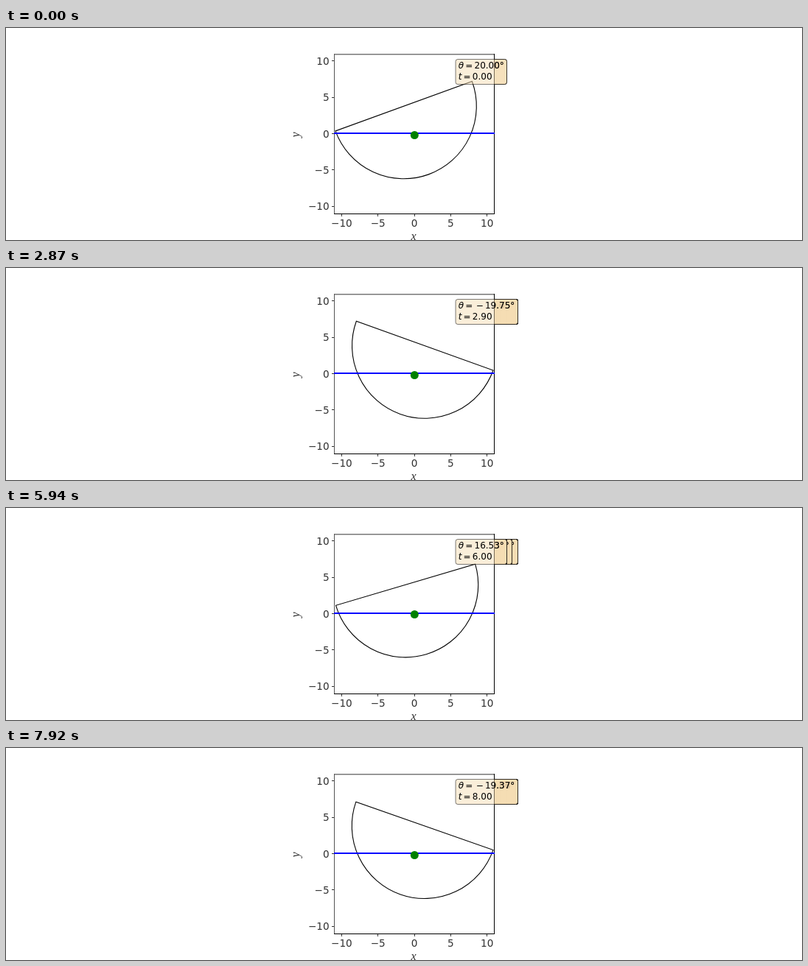
Write an HTML page with a canvas that moves like this. It is 1080 px wide and 288 px high and loops after 8 s.

```html
<!DOCTYPE html>
<html lang="en">
<head>
<meta charset="utf-8">
<title>Floating half disc</title>
<style>
  html, body { margin: 0; width: 100%; height: 100%; overflow: hidden; background: #fff; }
  canvas { display: block; }
</style>
</head>
<body>
<canvas width="1080" height="288"></canvas>
<script>
const ctx = document.querySelector('canvas').getContext('2d');
const LOOP = 8000, STEP = 99, LAST = 80, REPAINTS = 3;
const X0 = 554, Y0 = 143.5, SCALE = 217 / 22;
const LEFT = 445, TOP = 35, RIGHT = 663, BOTTOM = 253;

// Half disc of half the water's density: heave y and roll angle of its centroid
const R = 10, G = 9.81, MASS = 0.5 * Math.PI * R * R / 2;
const D = 4 * R / (3 * Math.PI), INERTIA = R * R / 2 - D * D;
const REST = 4.0397 - D;

function derive([angle, y, spin, rise]) {
  const h = y + D * Math.cos(angle);
  const submerged = R * R * Math.acos(h / R) - h * Math.sqrt(R * R - h * h);
  const lift = G * submerged / MASS;
  return [spin, rise, -lift * D * Math.sin(angle) / INERTIA, lift - G];
}

function rk4(s, dt) {
  const move = (k, f) => s.map((v, i) => v + k[i] * f);
  const a = derive(s), b = derive(move(a, dt / 2));
  const c = derive(move(b, dt / 2)), d = derive(move(c, dt));
  return s.map((v, i) => v + dt / 6 * (a[i] + 2 * b[i] + 2 * c[i] + d[i]));
}

const states = [[Math.PI / 9, REST, 0, 0]];
for (let i = 0; i < LAST; i++) {
  let s = states[i];
  for (let n = 0; n < 10; n++) s = rk4(s, 0.01);
  states.push(s);
}

const px = x => X0 + x * SCALE;
const py = y => Y0 - y * SCALE;

function rect(color, x, y, w, h) {
  ctx.fillStyle = color;
  ctx.fillRect(x, y, w, h);
}

function drawAxes() {
  rect('#fff', 0, 0, 1080, 288);
  ctx.font = '13.6px "DejaVu Sans", sans-serif';
  for (let v = -10; v <= 10; v += 5) {
    const label = String(v).replace('-', '−');
    rect('#333', LEFT - 3, Math.floor(py(v)), 3, 1);
    rect('#333', Math.floor(px(v)), BOTTOM, 1, 3);
    ctx.textAlign = 'right';
    ctx.fillText(label, 438.6, py(v) + 5);
    ctx.textAlign = 'center';
    ctx.fillText(label, px(v), 270);
  }
  ctx.font = 'italic 16px "Liberation Serif", serif';
  ctx.fillText('x', 553, 287.5);
  ctx.save();
  ctx.translate(398, 145);
  ctx.rotate(-Math.PI / 2);
  ctx.fillText('y', 0, 0);
  ctx.restore();
  ctx.textAlign = 'left';
}

function drawSpines() {
  rect('#777', LEFT, TOP, RIGHT - LEFT, 1);
  rect('#bbb', LEFT, TOP + 1, RIGHT - LEFT, 1);
  rect('#555', LEFT, TOP, 1, BOTTOM - TOP);
  rect('#000', RIGHT - 1, TOP, 1, BOTTOM - TOP);
  rect('#000', LEFT, BOTTOM - 1, RIGHT - LEFT, 1);
}

function drawDisc([angle, y]) {
  ctx.save();
  ctx.beginPath();
  ctx.rect(LEFT, TOP, RIGHT - LEFT, BOTTOM - TOP);
  ctx.clip();
  ctx.beginPath();
  ctx.arc(px(-D * Math.sin(angle)), py(y + D * Math.cos(angle)), R * SCALE, -angle, Math.PI - angle);
  ctx.closePath();
  ctx.strokeStyle = '#000';
  ctx.lineWidth = 1.1;
  ctx.stroke();
  rect('#00f', LEFT, 142, RIGHT - LEFT, 2);
  ctx.beginPath();
  ctx.arc(X0 + 0.3, Math.floor(py(y)) + 0.5, 5.5, 0, 2 * Math.PI);
  ctx.fillStyle = '#008000';
  ctx.fill();
  ctx.restore();
}

// Lays out "symbol = value" and returns its right end
function equation(symbol, value, y, paint) {
  const gap = 2.2;
  let x = 613.7;
  const put = (text, style = '') => {
    ctx.font = style + '12px "DejaVu Sans", sans-serif';
    if (paint) ctx.fillText(text, x, y);
    x += ctx.measureText(text).width;
  };
  put(symbol, 'italic ');
  x += gap;
  put('=');
  x += gap;
  if (value[0] === '-') {
    x += gap;
    put('−');
    x += gap;
  }
  put(value.replace('-', ''));
  return x;
}

function drawBox(k) {
  const angle = (states[k][0] * 180 / Math.PI).toFixed(2) + '°';
  const end = Math.round(equation('θ', angle, 55, false) + 3.2) + 0.5;
  ctx.beginPath();
  ctx.roundRect(610, 42.5, end - 610, 34, 3);
  ctx.fillStyle = 'rgba(245,222,179,.5)';
  ctx.fill();
  ctx.strokeStyle = 'rgba(0,0,0,.5)';
  ctx.lineWidth = 1;
  ctx.stroke();
  ctx.fillStyle = '#000';
  equation('θ', angle, 55, true);
  equation('t', (k / 10).toFixed(2), 70.3, true);
}

function clipped(x, w, paint) {
  ctx.save();
  ctx.beginPath();
  ctx.rect(x, 0, w, 288);
  ctx.clip();
  paint();
  ctx.restore();
}

function draw(k) {
  drawAxes();
  drawSpines();
  drawDisc(states[k]);
  clipped(0, RIGHT, () => drawBox(k));
  // Beyond the axes nothing is erased, so the translucent boxes pile up
  clipped(RIGHT, 100, () => {
    for (let i = 0; i < (k + 1) * REPAINTS; i++) drawBox(Math.floor(i / REPAINTS));
  });
}

let shown = -1;
function tick() {
  const k = Math.min(LAST, Math.floor((performance.now() % LOOP + 5) / STEP));
  if (k !== shown) draw(shown = k);
  requestAnimationFrame(tick);
}
tick();
</script>
</body>
</html>
```
